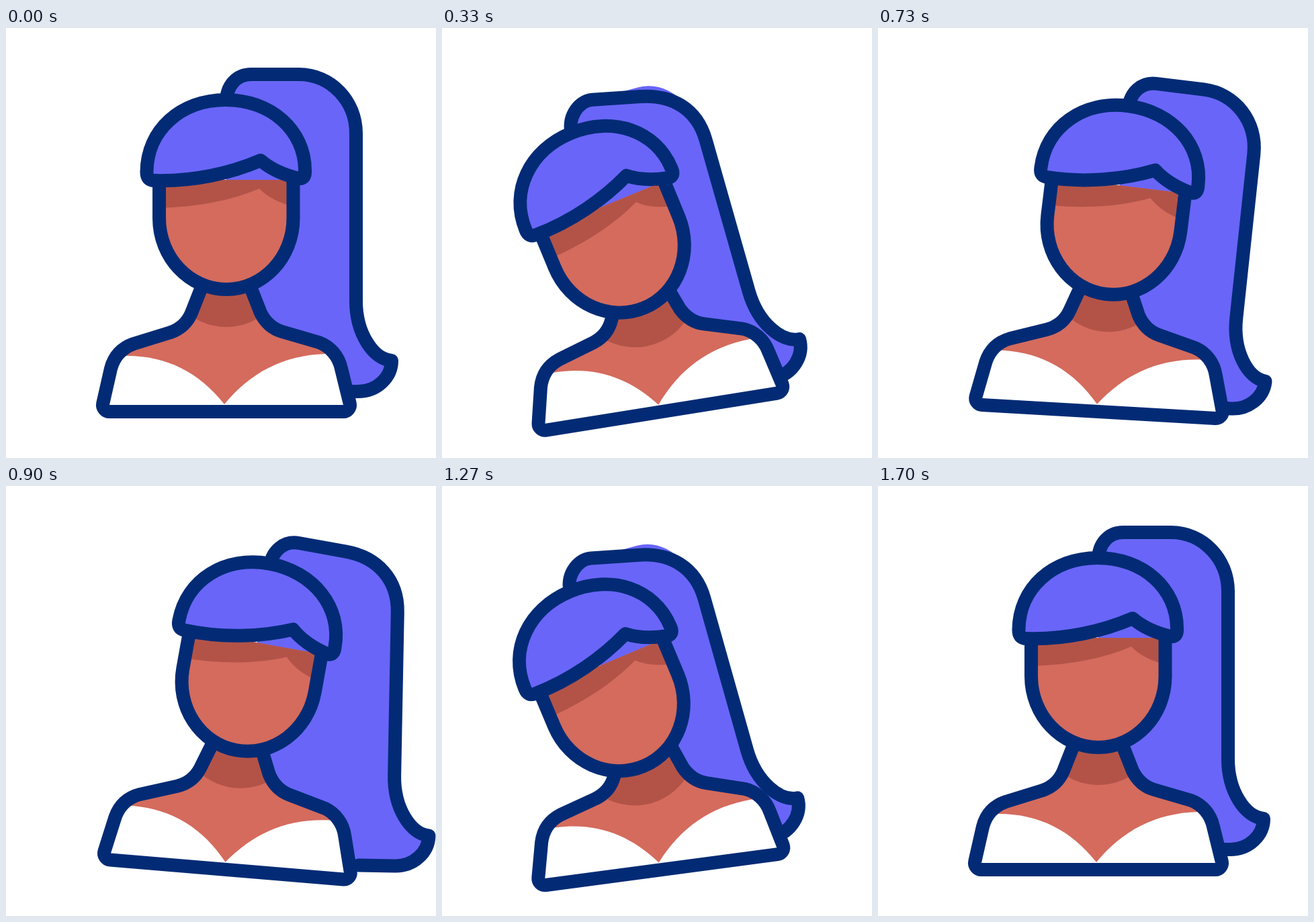
An HTML page with a canvas for the animation above (2000 ms loop, 640x640 px).

```html
<!DOCTYPE html>
<html lang="en">
<head>
<meta charset="utf-8">
<title>Swaying avatar</title>
<style>
html, body { margin: 0; width: 100%; height: 100%; overflow: hidden; background: #fff; }
canvas { display: block; width: 640px; height: 640px; }
</style>
</head>
<body>
<canvas id="stage" width="640" height="640"></canvas>
<script>
const ctx = document.getElementById('stage').getContext('2d');
const NAVY = '#032b75', HAIR = '#6965f8', SKIN = '#d46b5d', SHADE = '#b35348';
const LOOP = 2000, LAST = 51, HIP = [328, 578];

const bodyPath = new Path2D(
  'M154 571A10 10 0 0 1 144.2 559L156 507C161 488 173 476 190 470L245 453C262 447 271 436 276 424' +
  'L291 386L300 363L356 363L364 386L379 424C385 436 394 447 411 452L466 468' +
  'C482 474 495 488 499 507L511.8 559A10 10 0 0 1 502 571Z');
const topPath = new Path2D(
  'M100 488L180 488C240 488 288 513 325 560C364 513 412 487 476 485L560 485L560 600L100 600Z');
const facePath = new Path2D(
  'M228 226L228 283C228 341.5 273 389 328 389C383 389 427.5 341.5 427.5 283L427.5 226');
const capPath = new Path2D(
  'M209.5 214C210 152 260 107 327 107C394 107 445 152 445 212Q446 225 436 224' +
  'C415 219 395 211 379 197C335 216 278 229 221 227Q209 227 209.5 214Z');
const fringeShade = new Path2D(
  'M215 268C280 268 335 257 377 239C390 252 405 260 432 267L432 190L215 190Z');
const neckShade = new Path2D();
neckShade.ellipse(328, 345, 95, 100, 0, 0, 7);

const rad = deg => deg * Math.PI / 180;

function ease(x) {
  return (1 - Math.cos(Math.PI * Math.min(1, Math.max(0, x)))) / 2;
}

// Rest, left, right, left again, rest; times in steps of 1/30 s
function swing(f, left, right, again, rightAt = 25.1) {
  const at = [0, 12.7, rightAt, 36.85, LAST], to = [0, left, right, again, 0];
  let i = 0;
  while (i < 3 && f > at[i + 1]) i++;
  return to[i] + (to[i + 1] - to[i]) * ease((f - at[i]) / (at[i + 1] - at[i]));
}

// Offset (x, y) turned by an angle and added to a base point
function turn(base, deg, x, y) {
  const c = Math.cos(rad(deg)), s = Math.sin(rad(deg));
  return [base[0] + x * c - y * s, base[1] + x * s + y * c];
}

function poseAt(f) {
  const body = swing(f, -10.2, 5.6, -7.7);
  const head = swing(f, -25.2, 12.5, -23.2);
  const tail = swing(f, -17.8, 6.2, -16, 22.4);
  const active = ease(f / 10) * ease((LAST - f) / 13);
  const neck = [328 + 3.1 * head + 2 * active, 283 + 12.5 * active - 0.76 * head + 0.012 * head * head];
  // The crown of the ponytail follows the head, but lags when it leans left
  const lean = Math.max(0, -head);
  const top = turn(neck, head, 37, -214);
  top[0] += lean / 2;
  const crown = head + 0.83 * lean;
  const bend = turn(top, (crown + tail) / 2, 156, 88);
  const low = turn(bend, tail, 0, 249 - 7 * active + tail / 2);
  return { body, head, tail, neck, top, crown, puff: head + 0.33 * lean, bend, low };
}

function ponytail(p, crown) {
  const path = new Path2D();
  const curve = (a, b, c) => path.bezierCurveTo(...a, ...b, ...c);
  const end = (x, y) => turn(p.low, p.tail, x, y);
  path.moveTo(...turn(p.neck, p.head, 0, -173));
  curve(turn(p.neck, p.head, 0, -197), turn(p.top, crown, -22, 0), p.top);
  path.lineTo(...turn(p.top, crown, 71, 0));
  curve(turn(p.top, crown, 118, 0), turn(p.bend, p.tail, 0, -49), p.bend);
  path.lineTo(...p.low);
  curve(end(0, 49), end(26, 87), end(53, 89));
  curve(end(53, 114), end(31, 135), end(3, 135));
  path.lineTo(...end(-51, 135));
  return path;
}

function paint(path, color) {
  ctx.fillStyle = color;
  ctx.fill(path);
}

function outline(path) {
  ctx.strokeStyle = NAVY;
  ctx.lineWidth = 20;
  ctx.lineJoin = ctx.lineCap = 'round';
  ctx.stroke(path);
}

// Draws with the stage turned about a pivot that has moved to a new place
function turned(place, deg, pivot, draw) {
  ctx.save();
  ctx.translate(...place);
  ctx.rotate(rad(deg));
  ctx.translate(-pivot[0], -pivot[1]);
  draw();
  ctx.restore();
}

function clipped(path, draw) {
  ctx.save();
  ctx.clip(path);
  draw();
  ctx.restore();
}

function drawPonytail(p) {
  const fill = ponytail(p, p.puff);
  fill.lineTo(...turn(HIP, p.body, 0, -128));
  paint(fill, HAIR);
  outline(ponytail(p, p.crown));
}

function drawBody(p, inHead) {
  paint(bodyPath, SKIN);
  clipped(bodyPath, () => {
    ctx.save();
    ctx.resetTransform();
    inHead(() => paint(neckShade, SHADE));
    ctx.restore();
    paint(topPath, '#fff');
  });
  outline(bodyPath);
}

function drawHead() {
  paint(facePath, SKIN);
  clipped(facePath, () => paint(fringeShade, SHADE));
  outline(facePath);
  paint(capPath, HAIR);
  outline(capPath);
}

function render(ms) {
  const p = poseAt(Math.min(LAST, Math.floor((ms % LOOP + 3.5) * 0.03)));
  const inHead = draw => turned(p.neck, p.head, [328, 283], draw);
  ctx.fillStyle = '#fff';
  ctx.fillRect(0, 0, 640, 640);
  drawPonytail(p);
  turned(HIP, p.body, HIP, () => drawBody(p, inHead));
  inHead(drawHead);
}

let start;
function tick(now) {
  if (start === undefined) start = now;
  render(now - start);
  requestAnimationFrame(tick);
}
render(0);
requestAnimationFrame(tick);
</script>
</body>
</html>
```
